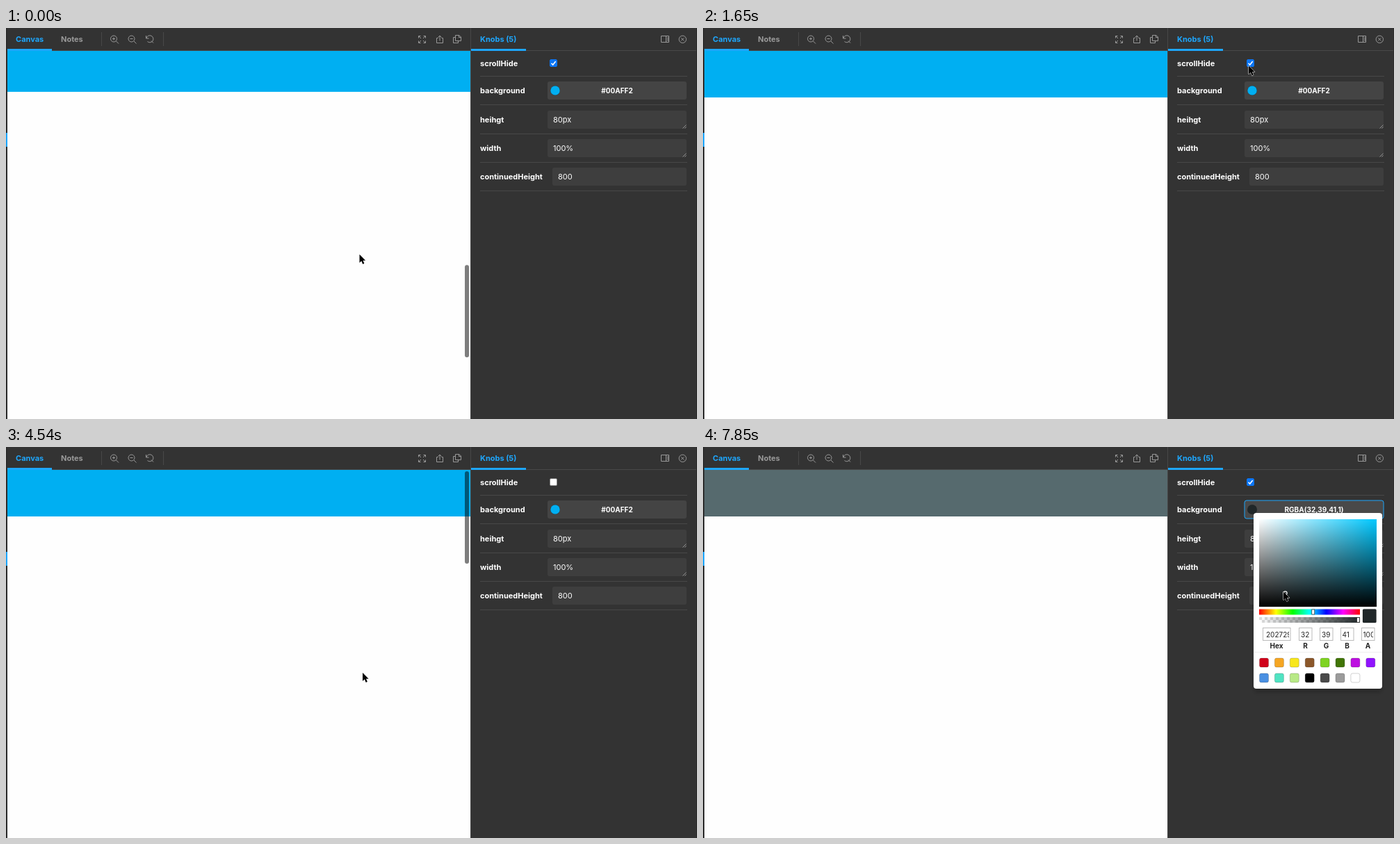
An HTML page that plays this animation: 994 by 563 pixels, repeating every 8000 ms.

```html
<!DOCTYPE html>
<html lang="en">
<head>
<meta charset="utf-8">
<title>Scroll header knobs</title>
<style>
  html, body { margin: 0; width: 100%; height: 100%; overflow: hidden; background: #333; }
  svg { display: block; }
  text { font: 400 11px Inter, "Open Sans", sans-serif; fill: #fff; }
  .b { font-weight: 700; }
  .on { fill: #1ea7fd; }
  .s { font-size: 10px; }
  .dark text { fill: #222; font-size: 10px; }
  .icon { fill: none; stroke: #999; stroke-width: 1; }
  .line { stroke: #484848; }
  .field { fill: #3e3e3e; }
</style>
</head>
<body>
<svg id="stage" width="994" height="563" viewBox="0 0 994 563">
  <defs>
    <linearGradient id="white"><stop stop-color="#fff"/><stop offset="1" stop-color="#fff" stop-opacity="0"/></linearGradient>
    <linearGradient id="black" x2="0" y2="1"><stop stop-opacity="0"/><stop offset="1"/></linearGradient>
    <linearGradient id="rainbow"></linearGradient>
    <linearGradient id="fade"><stop class="tint" stop-opacity="0"/><stop class="tint" offset="1"/></linearGradient>
    <pattern id="check" x="800" y="245" width="8" height="8" patternUnits="userSpaceOnUse">
      <path fill="#fff" d="M0 0h8v8h-8z"/><path fill="#ddd" d="M0 0h4v4h-4zM4 4h4v4h-4z"/>
    </pattern>
    <filter id="blur"><feGaussianBlur stdDeviation="2"/></filter>
  </defs>

  <rect width="994" height="563" fill="#333"/>
  <rect width="2" height="563" fill="#2d2d2d"/>
  <rect y="151" width="2" height="20" fill="#1ea7fd"/>
  <path class="line" d="M2 32.5H993M668.5 0V563M137.5 6V26M226.5 6V26"/>
  <path stroke="#2b2b2b" d="M993.5 0V563"/>
  <rect x="2" y="33" width="666" height="530" fill="#fefefe"/>
  <rect id="header" x="2" y="33" width="666"/>
  <rect id="thumb" x="660" width="6" height="133" rx="3" opacity=".5"/>

  <path class="on" d="M2 30H66V33H2zM669 30H748V33H669z"/>
  <text class="b on" x="14" y="20">Canvas</text>
  <text class="b" x="79" y="20" style="fill:#999">Notes</text>
  <text class="b on" x="682" y="20">Knobs (5)</text>

  <g class="icon">
    <g id="lens"><circle cx="155" cy="15.500" r="4.500"/><path d="M158.300 18.800L162 22.500M153 15.500H157"/></g>
    <use href="#lens" x="25.500"/>
    <path d="M155 13.500V17.500"/>
    <path d="M201.500 11V15H205.500M202 14.500A5 5 0 1 1 203.500 19.500M209 18.500L212 21.500"/>
    <path d="M593.500 14.500V11.500H596.500M600.500 11.500H603.500V14.500M603.500 18.500V21.500H600.500M596.500 21.500H593.500V18.500M594 12L597 15M603 12L600 15M603 21L600 18M594 21L597 18"/>
    <path d="M621.500 14.500H619.500V21.500H628.500V14.500H626.500M624 18.500V11M621.500 13.500L624 11L626.500 13.500"/>
    <path d="M646.500 13.500H643.500V21.500H650.500V18.500M646.500 10.500H652L654.500 13V18.500H646.500zM651.500 10.500V13.500H654.500"/>
    <path d="M942.500 11.500H953.500V20.500H942.500zM949.500 11.500V20.500M951 14H953M951 16H953M951 18H953"/>
    <circle cx="973.300" cy="16.300" r="5.200"/><path d="M971.300 14.300L975.300 18.300M975.300 14.300L971.300 18.300"/>
  </g>

  <path class="line" d="M682 69.500H980M682 110.500H980M682 152.500H980M682 193.500H980M682 234.500H980"/>
  <g class="b">
    <text class="b" x="682" y="55">scrollHide</text>
    <text class="b" x="682" y="94">background</text>
    <text class="b" x="682" y="136">heihgt</text>
    <text class="b" x="682" y="177">width</text>
    <text class="b" x="682" y="218">continuedHeight</text>
  </g>
  <rect id="box" x="782.500" y="45.500" width="10" height="10" rx="1.500"/>
  <path id="tick" d="M784.500 50.800L786.700 53L790.700 48" fill="none" stroke="#fff" stroke-width="1.600"/>
  <rect id="button" x="779" y="77" width="200" height="26" rx="3"/>
  <circle id="dot" cx="790" cy="90" r="6.800" stroke="#000" stroke-opacity=".15"/>
  <text id="value" class="b s" x="879" y="93.700" text-anchor="middle"></text>
  <rect class="field" x="779" y="119" width="200" height="26" rx="3"/>
  <rect class="field" x="779" y="160" width="200" height="26" rx="3"/>
  <rect class="field" x="786" y="201" width="193" height="26" rx="3"/>
  <path stroke="#aaa" stroke-width=".8" d="M973.500 144.500L978.500 139.500M976.500 144.500L978.500 142.500M973.500 185.500L978.500 180.500M976.500 185.500L978.500 183.500"/>
  <text x="787" y="136">80px</text>
  <text x="787" y="177">100%</text>
  <text x="794" y="218">800</text>

  <g id="picker">
    <rect x="792" y="101" width="185" height="253" rx="6" opacity=".16" filter="url(#blur)"/>
    <rect x="792" y="95" width="185" height="253" rx="4" fill="#fff"/>
    <rect id="hueArea" x="800" y="104" width="169" height="126"/>
    <rect x="800" y="104" width="169" height="126" fill="url(#white)"/>
    <rect x="800" y="104" width="169" height="126" fill="url(#black)"/>
    <svg x="800" y="104" width="169" height="126"><circle id="ring" r="2.500" fill="none" stroke="#fff" stroke-width="1.200"/></svg>
    <rect x="800" y="233.500" width="145" height="8" fill="url(#rainbow)"/>
    <rect x="800" y="245" width="145" height="8" fill="url(#check)"/>
    <rect x="800" y="245" width="145" height="8" fill="url(#fade)"/>
    <rect id="hueMark" y="234" width="4" height="7" fill="#fff" stroke="#444" stroke-width=".8"/>
    <rect x="940.500" y="245.500" width="4" height="7" fill="#fff" stroke="#222" stroke-width=".8"/>
    <rect id="sample" x="949" y="233.500" width="19.500" height="19.500" rx="1.500" stroke="#000" stroke-opacity=".2"/>
    <g id="inputs" class="dark"></g>
    <path stroke="#eee" d="M792 295.500H977"/>
    <g id="swatches"></g>
  </g>

  <path id="arrow" d="M0 0V12L2.800 9.500L4.700 14L6.900 13L5 8.700H8.600z" stroke="#fff" stroke-width="1" paint-order="stroke"/>
  <path id="hand" fill="#fff" stroke="#111" stroke-width=".9" stroke-linejoin="round"
    d="M-1.500 7V1C-1.500 -.500 .8 -.500 .8 1V5C1.500 4.200 2.800 4.500 3 5.500C4 4.800 5 5.200 5.200 6.200C6.300 5.800 7.200 6.500 7.200 7.500C7.200 10 6.500 11 6 13.500H-.200C-1 11.500 -3 9.800 -4 8C-4.300 6.500 -2.700 6.200 -1.500 8z"/>
</svg>
<script>
const LOOP = 8000, BLUE = [0, 175, 242], HUE = 192;
const $ = id => document.getElementById(id);
const set = (el, attrs) => { for (const k in attrs) el.setAttribute(k, attrs[k]); };
const show = (el, on) => set(el, { display: on ? 'inline' : 'none' });
const clamp = x => Math.min(1, Math.max(0, x));
const ease = (t, a, b) => { const p = clamp((t - a) / (b - a)); return p * p * (3 - 2 * p); };
const mix = (a, b, p) => a + (b - a) * p;
const css = c => `rgb(${c.map(Math.round)})`;

function add(parent, name, attrs) {
  const el = document.createElementNS('http://www.w3.org/2000/svg', name);
  set(el, attrs);
  return parent.appendChild(el);
}

// Eased travel between keys of the form [time, ...values].
function along(keys, t) {
  let i = 0;
  while (i < keys.length - 2 && t >= keys[i + 1][0]) i++;
  const a = keys[i], b = keys[i + 1], p = ease(t, a[0], b[0]);
  return a.slice(1).map((v, k) => mix(v, b[k + 1], p));
}

const cursorKeys = [
  [0, 508.5, 326], [1230, 508.5, 326], [1640, 785, 54.5], [1960, 785, 54.5],
  [2600, 497.5, 340], [4450, 497.5, 340], [4540, 513, 325], [5310, 785, 54.5],
  [5590, 785, 54.5], [5840, 808, 112], [6020, 800, 92], [6200, 800, 92],
  [6540, 805.5, 168], [6980, 832, 156], [7070, 832, 156], [7590, 834.7, 174],
  [7690, 834.7, 174], [7850, 835, 208.4]
];

function thumbTop(t) {
  if (t < 2000) return mix(341, 461, 1 - (1 - clamp(t / 870)) ** 2);
  return along([[2870, 94], [3400, 461], [3590, 461], [4450, 35]], t)[0];
}

function thumbAlpha(t) {
  if (t < 2000) return .5 * (1 - ease(t, 1430, 1650));
  return t < 2870 ? 0 : .5 * (1 - ease(t, 5000, 5300));
}

const headerHeight = t =>
  67 * (t < 1000 ? 1 - ease(t, -75, 275) : ease(t, 1075, 1435));

function picked(t) {
  const [x, y] = along(cursorKeys, t);
  const s = clamp((x + 2.2 - 800) / 168), v = 255 * clamp(1 - (y + 1.4 - 104) / 126);
  return [v * (1 - s), v * (1 - s * (HUE - 180) / 60), v];
}

for (let i = 0; i <= 6; i++)
  add($('rainbow'), 'stop', { offset: i / 6, 'stop-color': `hsl(${i * 60},100%,50%)` });

const inputs = [['Hex', 805, 40, 5], ['R', 857, 19, 3], ['G', 887, 19, 3], ['B', 917, 19, 2.5], ['A', 947, 19, 2.5]]
  .map(([label, x, w, pad]) => {
    const g = $('inputs');
    add(g, 'rect', { x: x + .5, y: 260.5, width: w - .5, height: 18, fill: '#fff', stroke: '#bbb' });
    add(g, 'text', { x: x + w / 2, y: 289.7, 'text-anchor': 'middle', class: 'b' }).textContent = label;
    const clip = add(g, 'svg', { x: x + pad, y: 261, width: w - pad - 2, height: 17 });
    return add(clip, 'text', { x: 0, y: 12.7 });
  });

'#d0021b #f5a623 #f8e71c #8b572a #7ed321 #417505 #bd10e0 #9013fe #4a90e2 #50e3c2 #b8e986 #000 #4a4a4a #9b9b9b #fff'
  .split(' ').forEach((fill, i) => add($('swatches'), 'rect', {
    x: 800.5 + i % 8 * 21.9, y: i < 8 ? 304 : 326, width: 13, height: 13, rx: 2.5,
    fill, stroke: '#000', 'stroke-opacity': .18
  }));

function draw(t) {
  const [x, y] = along(cursorKeys, t);
  const dragging = t >= 7070, open = t >= 6190;
  const checked = t < 1900 || t >= 5500;
  const rgb = dragging ? picked(t) : BLUE;
  const fill = css(rgb), nums = rgb.map(Math.round);
  const hue = dragging ? 193 : 196.5;

  const target = picked(Math.min(t, 7590)), p = ease(t, 7070, 7400);
  set($('header'), {
    height: headerHeight(t),
    fill: css(dragging ? BLUE.map((c, i) => mix(c, target[i], p)) : BLUE)
  });
  set($('thumb'), { y: thumbTop(t), opacity: thumbAlpha(t) });

  set($('box'), { fill: checked ? '#0b75f5' : '#fff', stroke: checked ? '#0b75f5' : '#858585' });
  show($('tick'), checked);
  const hover = x > 779 && y > 77 && y < 103;
  set($('button'), { fill: open || hover ? '#494949' : '#444', stroke: open ? '#1ea7fd' : 'none' });
  set($('dot'), { fill });
  $('value').textContent = dragging ? `RGBA(${nums},1)` : '#00AFF2';

  show($('picker'), open);
  set($('hueArea'), { fill: `hsl(${hue},100%,50%)` });
  set($('hueMark'), { x: 798 + hue / 360 * 145 });
  set($('ring'), { cx: dragging ? x + 2.6 - 800 : 168.5, cy: dragging ? y + 2 - 104 : 6.4 });
  set($('sample'), { fill });
  document.querySelectorAll('.tint').forEach(s => set(s, { 'stop-color': fill }));
  const hex = nums.map(n => n.toString(16).padStart(2, '0')).join('').toUpperCase();
  [hex, ...nums, 100].forEach((v, i) => { inputs[i].textContent = v; });

  const pointing = t >= 6020 && !dragging;
  const place = { transform: `translate(${x} ${y})` };
  set($('arrow'), place);
  set($('hand'), place);
  show($('arrow'), !pointing);
  show($('hand'), pointing);
}

const start = performance.now();
function tick() {
  draw((performance.now() - start) % LOOP);
  requestAnimationFrame(tick);
}
tick();
</script>
</body>
</html>
```
